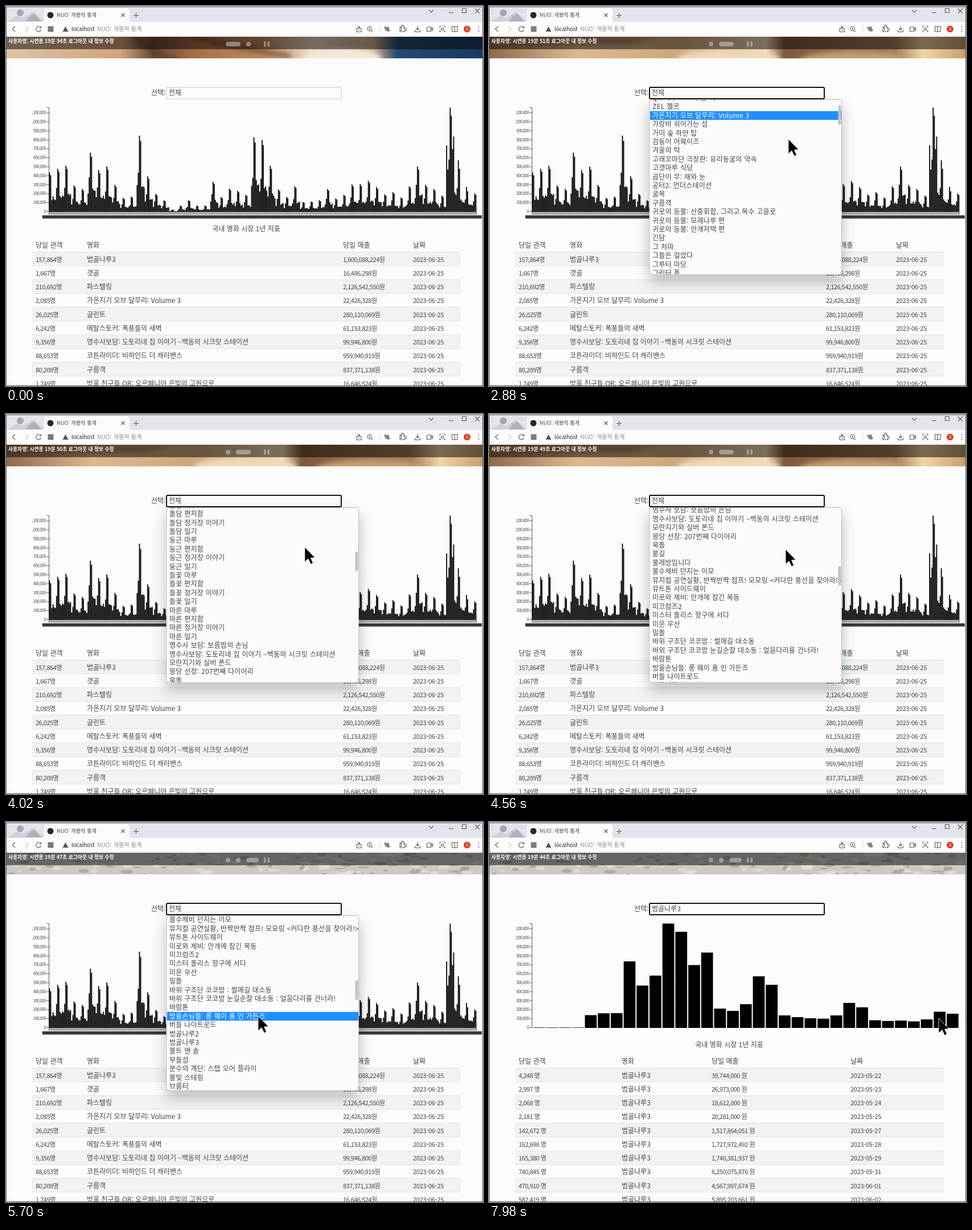
An HTML page for the animation above (8000 ms loop, 838 by 668 pixels).

```html
<!DOCTYPE html>
<html lang="ko">
<head>
<meta charset="utf-8">
<title>개봉작 통계</title>
<style>
html, body { margin: 0; width: 100%; height: 100%; overflow: hidden; background: #fcfcfc; }
svg { display: block; }
text { font: 400 12px "Noto Sans CJK KR", "Noto Sans CJK", "Noto Sans", sans-serif; fill: #414346; white-space: pre; }
.head { font-weight: 500; }
.num { font-size: 11px; letter-spacing: -.5px; }
.date { font-size: 11px; letter-spacing: -.25px; }
.axis { font-size: 7px; letter-spacing: -.45px; text-anchor: end; }
.option { letter-spacing: .25px; }
.bar { font-size: 8.75px; font-weight: 700; fill: #fff; }
.icon { fill: none; stroke: #555a60; stroke-width: 1.1; }
</style>
</head>
<body>
<svg id="stage" width="838" height="668" viewBox="0 0 838 668">
  <defs>
    <clipPath id="photoClip"><rect x="1" y="54" width="836" height="38"/></clipPath>
    <clipPath id="listClip"><rect x="283" y="165" width="336" height="306.5"/></clipPath>
    <clipPath id="axisClip"><rect x="46" y="170" width="40" height="200"/></clipPath>
    <filter id="soft"><feGaussianBlur stdDeviation="4"/></filter>
    <filter id="shadow" x="-20%" y="-20%" width="140%" height="140%">
      <feDropShadow dx="0" dy="12" stdDeviation="12" flood-opacity=".25"/>
    </filter>
    <linearGradient id="fur">
      <stop offset="0" stop-color="#dfc3a6"/><stop offset=".24" stop-color="#d2a27b"/>
      <stop offset=".31" stop-color="#6a4834"/><stop offset=".4" stop-color="#a97048"/>
      <stop offset=".54" stop-color="#c18b5e"/><stop offset=".64" stop-color="#ead8c2"/>
      <stop offset=".77" stop-color="#cfae91"/><stop offset=".82" stop-color="#254a70"/>
      <stop offset="1" stop-color="#183a60"/>
    </linearGradient>
    <linearGradient id="warm">
      <stop offset="0" stop-color="#8f6a4c"/><stop offset=".18" stop-color="#dcb88f"/>
      <stop offset=".4" stop-color="#cfa67b"/><stop offset=".58" stop-color="#f3ddbb"/>
      <stop offset=".62" stop-color="#80583b"/><stop offset=".85" stop-color="#a67b56"/>
      <stop offset=".91" stop-color="#f1d5a6"/><stop offset="1" stop-color="#c99c6c"/>
    </linearGradient>
  </defs>

  <rect width="838" height="668" fill="#fcfcfc"/>
  <rect width="838" height="28" fill="#e1e4ea"/>
  <path d="M4 27L20 17L30 22L47 10L66 27Z" fill="#cdd0d6"/>
  <path d="M41 18L50 13L62 27H36Z" fill="#aeb2b9"/>
  <circle cx="25" cy="12" r="6" fill="#a3a7ad"/>
  <path d="M64 28Q67 28 67 23V9Q67 4 72 4H212Q217 4 217 9V23Q217 28 220 28Z" fill="#fbfbfc"/>
  <circle cx="78" cy="16" r="5.5" fill="#2b2622"/>
  <text x="89" y="19" style="font-size:9.2px">NUO: 개봉작 통계</text>
  <rect y="28" width="838" height="26" fill="#fdfdfd"/>
  <g class="icon">
    <path d="M202.500 13l6 6m0-6l-6 6M224 16.500h9m-4.500-4.500v9M743 7l4 4l4-4M778 11.500h8M801.500 4.500h7v7h-7zM824 4.500l8 8m0-8l-8 8"/>
    <path d="M16 36l-5 4.500l5 4.500"/>
    <path d="M34 36l5 4.500l-5 4.500" stroke="#c3c5c8"/>
    <path d="M61 38a4.600 4.600 0 1 0 .5 4M61.500 35.500v3h-3"/>
    <path d="M618 39.500h-2v6h8v-6h-2M620 43v-7m-2.500 2.500l2.500-2.500l2.500 2.500"/>
    <circle cx="638.500" cy="40" r="3.700"/><path d="M641.200 42.700l3 3M637 40h3m-1.500-1.500v3"/>
    <path d="M656.500 35v11" stroke="#d6d8da"/>
    <path d="M692 37h3a2 2 0 1 1 3 0h2v3a2 2 0 1 1 0 3v2h-8v-3a2 2 0 1 0 0-3z"/>
    <path d="M723 35v7m-3-3l3 3l3-3M718.500 42v3.500h9V42M739.500 37h7v7.500h-7zM746.500 40l3-2v5l-3-2"/>
    <path d="M762 38v-2.500h2.500m4 0h2.500v2.500m0 4.500v2.500h-2.500m-4 0H762v-2.500M783.500 36h9.500v9h-9.500zM788.200 36v9"/><circle cx="766.500" cy="40.500" r="2"/>
  </g>
  <rect x="73.500" y="35.500" width="10" height="10" rx="1" fill="#777c82"/>
  <path d="M104.500 36l5 9h-10z" fill="#4f545a"/>
  <path d="M664 36l4 1l4-1l1 4l2 4l-5 1l-4-3z" fill="#7d8287"/>
  <circle cx="810" cy="40.500" r="6" fill="#e0402f"/>
  <text x="810" y="43" text-anchor="middle" style="font-size:7px;fill:#fff">S</text>
  <path d="M830.500 36v10" stroke="#555a60" stroke-width="1.600" stroke-dasharray="1.600 2.400"/>
  <text x="115" y="44" style="font-size:9.500px;fill:#222">localhost</text>
  <text x="160" y="44" style="font-size:10.300px;fill:#8b8e92">NUO: 개봉작 통계</text>

  <g clip-path="url(#photoClip)">
    <g class="slide">
      <rect x="0" y="54" width="838" height="38" fill="url(#fur)"/>
      <g filter="url(#soft)"><path d="M225 50q30 38 75 44M320 50q60 20 180 38" fill="none" stroke="#52362a" stroke-width="9" opacity=".6"/><ellipse cx="590" cy="94" rx="70" ry="20" fill="#f4e9d9"/></g>
    </g>
    <g class="slide">
      <rect x="0" y="54" width="838" height="38" fill="url(#warm)"/>
      <g filter="url(#soft)"><ellipse cx="420" cy="92" rx="90" ry="15" fill="#f0d8b5"/><ellipse cx="640" cy="96" rx="95" ry="16" fill="#c79d74"/><path d="M0 54h300l-60 14H60z" fill="#8a6140" opacity=".6"/></g>
    </g>
    <g class="slide" id="stone"><rect x="0" y="54" width="838" height="38" fill="#cdc8c1"/></g>
    <rect y="54" width="838" height="22" opacity=".5"/>
  </g>
  <text class="bar" id="clock" x="4" y="65"></text>
  <g fill="#d0d4da" opacity=".5">
    <rect class="dot" y="63" height="8" rx="4"/><rect class="dot" y="63" height="8" rx="4"/><rect class="dot" y="63" height="8" rx="4"/>
    <path d="M453 62.500h3.500v9H453zM459.500 62.500h3.500v9h-3.500z"/>
  </g>

  <text x="255" y="157">선택:</text>
  <rect id="field" x="282" y="143" width="307" height="20" fill="#fdfcfd"/>
  <text id="choice" x="286" y="157"></text>

  <g id="axis"></g>
  <text x="422" y="396" text-anchor="middle">국내 영화 시장 1년 지표</text>
  <g id="stripes"></g>
  <g id="all"></g>
  <g id="one"></g>

  <g id="popup">
    <rect x="282" y="164.500" width="337.500" height="307.500" rx="4" fill="#fdfafd" stroke="#bdbdc0" filter="url(#shadow)"/>
    <g clip-path="url(#listClip)">
      <g id="list"><rect id="hover" x="282" width="337" height="15.400" fill="#1e90ff"/></g>
      <rect id="thumb" x="613.500" width="5" height="34" rx="2.500" fill="#c2c2c5"/>
    </g>
  </g>
  <path d="M.5 668V1.500H837.500V668M0 667.500H838" fill="none" stroke="#5a5c60"/>
  <path id="cursor" d="M0 0V26L6 20.500L10.500 30L14.500 28L10.500 19L18 18.500Z" stroke="#fff" stroke-width=".8"/>
</svg>

<script>
const LOOP = 8000, FRAME = 60, ROW = 15.4, LIST_TOP = 164.4, BASE = 362, SCALE = .1579;
const OPEN = 1620, PICK = 6660, LOADED = 6840;
const $ = id => document.getElementById(id);
const add = (id, markup) => $(id).insertAdjacentHTML('beforeend', markup);
const text = (x, y, s, cls = '') => `<text x="${x}" y="${y}" class="${cls}">${s}</text>`;

let seed = 7;
const random = () => (seed = seed * 16807 % 2147483647) / 2147483647;

const PICKED = '범골나루3';
const CASE = '명수사보담: 도토리네 집 이야기 ~백동의 시크릿 스테이션';
const SPACE = '가온지기 오브 달무리: Volume 3';
const fillers = ['돌담', '둥근', '들꽃', '마른'].flatMap(a => ['마루', '편지함', '정거장 이야기', '일기'].map(b => a + ' ' + b));
const titles = [
  ...`전체|1802호의 이웃들|2층의 라디오|4월의 낮달|9번 창고|QK 파수 오브 구름-팩|ZEL 젤르|${SPACE}|가랑비 쉬어가는 섬|거미 숲 하얀 탑|검둥이 어웨이즈|겨울의 턱|고래꼬마단 극장판: 유리동굴의 약속|고갯마루 식당|곱단이 무: 재와 눈|공터2: 언더스테이션|굴목|구름객|귀로의 등불: 산중회합, 그리고 목수 고을로|귀로의 등불: 모래나루 편|귀로의 등불: 안개저택 편|긴담|그 처마|그들은 걸었다|그루터 마당|그린터 폴`.split('|'),
  ...'극장판 콩이네 야단법석: 구름소동 목수 딱지원정대|극장판 콩이네 야단법석: 와글와글! 춤추는 버섯골운동회|극장판 방울친구단QR: 소나기와 바람의 종이배 무리미|극장판 로보씽씽: 신기한 열차역의 편지|꼬마오리 나롱의 들판 대소동|나무 아래에 눕다|낮은 지붕 30호|내 작은 이모의 점심바구니|너른 들을 가로지르면|너머 골목은.|네모 서랍속의 젖은 우산|논틀|눅|눈썹 대장5: 코튼 캡틴나리와 버튼타운의 소문|느릅마당|니 모자 그림자 접고 간다|니은집|다섯 나루|대숲길|대패질'.split('|'),
  ...fillers,
  ...`명수사 보담: 보름밤의 손님|${CASE}|모란지기와 실버 폰드|몽당 선장: 207번째 다이어리|묵돌|뭍길|물레방입니다|물수제비 던지는 이모|뮤지컬 공연실황, 반짝반짝 점프! 모모링 &lt;커다란 풍선을 찾아라!&gt;|뮤트톤 사이드웨이|미로와 제비: 안개에 잠긴 목동|미끄럼즈2|미스터 돌리스 항구에 서다|미운 우산|밀돌|바위 구조단 코코밤 : 썰매길 대소동|바위 구조단 코코밤 눈길순찰 대소동 : 얼음다리를 건너라!|바람톤|방울손님들: 롱 웨이 홈 인 가든즈|버들 나이트로드|범골나루2|${PICKED}|볼트 앤 솔|부들섬|분수의 계단: 스텝 오어 플라이|불빛 스테핑|브룸터`.split('|')
];

// Thousands of viewers: Saturday peaks over a year, then the days of one film.
const peaks = [440, 480, 515, 295, 255, 660, 465, 505, 300, 155, 170, 850, 395, 200, 130, 25, 70, 130, 70, 70, 335, 165, 260, 235, 190, 830, 800, 515, 250, 165, 285, 110, 115, 130, 255, 150, 190, 305, 310, 345, 275, 195, 220, 160, 285, 505, 300, 255, 180, 150, 150, 150, 205];
const film = [4, 3, 2, 2, 143, 163, 165, 741, 471, 582, 1163, 1070, 700, 840, 215, 190, 265, 575, 480, 140, 120, 108, 103, 140, 278, 230, 85, 77, 82, 72, 95, 180, 158];
const weekShape = [1, .93, .36, .34, .34, .3, .5];
const DAYS = 366;

function dayValue(day) {
  const week = Math.floor(day / 7), weekday = day % 7;
  const peak = peaks[weekday > 4 ? Math.min(week + 1, 52) : week];
  const jitter = weekday < 2 ? 1 : .85 + .35 * random();
  return Math.max(peak * weekShape[weekday] * jitter, film[day - DAYS + film.length - 0] && day >= DAYS - 26 ? film[day - DAYS + film.length] : 0);
}

function bars(values, left, pitch, width) {
  const d = values.map((v, i) => `M${(left + i * pitch).toFixed(2)} ${BASE}v${(-Math.max(v * SCALE, .7)).toFixed(1)}h${width}V${BASE}z`);
  return `<path d="${d.join('')}"/>`;
}

function table(columns, heads, rows) {
  const classes = ['num', '', 'num', 'date'];
  return heads.map((h, c) => text(columns[c], 425, h, 'head')).join('') +
    rows.map((row, r) => row.map((cell, c) => text(columns[c], 449.5 + r * 24.25, cell, classes[c])).join('')).join('');
}

const yearRows = `157,864|${PICKED}|1,600,088,224
1,667|갯골|16,486,298
210,692|파스텔링|2,126,542,550
2,085|${SPACE}|22,426,328
26,025|글린트|280,110,069
6,242|메탈스토커: 폭풍들의 새벽|61,153,823
9,356|${CASE}|99,946,800
88,653|코튼라이더: 비하인드 더 캐러밴스|959,940,919
80,209|구름객|837,371,138
1,749|방울 친구들 QR: 오르페니아 은빛의 고원으로|16,646,524`
  .split('\n').map(line => line.split('|')).map(([n, title, won]) => [n + '명', title, won + '원', '2023-06-25']);

const filmRows = `4,248|39,744,000|05-22
2,997|26,973,000|05-23
2,068|18,612,000|05-24
2,181|20,281,000|05-25
142,672|1,517,864,051|05-27
162,698|1,727,972,492|05-28
165,380|1,740,381,937|05-29
740,845|6,250,075,876|05-31
470,910|4,567,997,674|06-01
582,419|5,895,203,661|06-02`
  .split('\n').map(line => line.split('|')).map(([n, won, date]) => [n + ' 명', PICKED, won + ' 원', '2023-' + date]);

const heads = ['당일 관객', '영화', '당일 매출', '날짜'];
let ticks = '', labels = '';
for (let i = 0; i < 12; i++) {
  const y = 361.5 - i * 15.79;
  ticks += `M71 ${y}h4.500`;
  labels += text(70, y + 2.5, (i * 100000).toLocaleString('en-US'), 'axis');
}
add('axis', `<path d="M71 178.500H75.500V361.500${ticks}" fill="none" stroke="#333" stroke-width=".8"/><g clip-path="url(#axisClip)">${labels}</g>`);

for (let r = 0; r < 10; r++) {
  const y = 432.5 + r * 24.25;
  add('stripes', `<rect x="46" y="${y}" width="753" height="24.250" fill="${r % 2 ? '#fcfcfc' : '#f0f2f4'}"/><path d="M46 ${y}h753" stroke="#dfe3e7"/>`);
}
add('all', bars(Array.from({ length: DAYS }, (_, d) => dayValue(d)), 75.6, 2.052, 1.75) +
  `<path d="M75 364.500H828" stroke="#555" stroke-width="5" stroke-dasharray="1 1.052"/>
   <path d="M64 370.700H836" stroke="#777" stroke-width="5.500"/>
   <path d="M64 370.700H836" stroke="#1c1c1c" stroke-width="5.500" stroke-dasharray="1.400 .652"/>` +
  table([52, 142, 592, 715], heads, yearRows));
add('one', bars(film, 77.7, 22.7, 20.7) + table([52, 233, 391, 635], heads, filmRows));
add('list', titles.map((s, i) => text(287, (LIST_TOP + i * ROW + 12).toFixed(1), s, 'option')).join(''));
for (let i = 0; i < 140; i++) {
  add('stone', `<ellipse cx="${random() * 838}" cy="${54 + random() * 38}" rx="${3 + random() * 9}" ry="${1 + random() * 3}" fill="${random() < .5 ? '#8f8a84' : '#ece9e4'}" opacity=".5"/>`);
}

const scrollKeys = [[2400, 0], [2880, 87.4], [3270, 403.4], [3570, 403.4], [4020, 720], [4260, 720], [4560, 957.8], [4800, 1062.6]];
const cursorKeys = [[1020, 640, 28], [1320, 553, 141], [1500, 545, 155], [2340, 545, 155], [2640, 526, 234], [3960, 525, 234], [4560, 521, 238], [4920, 521, 238], [5640, 443, 341], [5880, 443, 341], [6180, 443, 378], [6360, 444, 383], [7020, 444, 383], [7500, 640, 335], [7800, 812, 340], [7980, 790, 345]];
const clockTicks = [900, 1620, 2400, 3240, 4260, 4980, 5580, 6120, 6840, 7560];
const slideStarts = [780, 5160], SLIDE_TIME = 480;

const clamp = v => Math.min(1, Math.max(0, v));
const smooth = p => p * p * (3 - 2 * p);

function keyed(keys, t, column, ease = p => p) {
  const next = keys.findIndex(k => k[0] > t);
  if (next === 0) return keys[0][column];
  if (next < 0) return keys[keys.length - 1][column];
  const a = keys[next - 1], b = keys[next];
  return a[column] + (b[column] - a[column]) * ease((t - a[0]) / (b[0] - a[0]));
}

const show = (id, on) => $(id).setAttribute('visibility', on ? 'visible' : 'hidden');
const slides = document.querySelectorAll('.slide'), dots = document.querySelectorAll('.dot');

function drawCarousel(t) {
  const place = slideStarts.reduce((sum, start) => sum + smooth(clamp((t - start) / SLIDE_TIME)), 0);
  const active = slideStarts.filter(start => t >= start).length;
  slides.forEach((s, i) => s.setAttribute('transform', `translate(${(i - place) * 838})`));
  dots.forEach((dot, i) => {
    dot.setAttribute('x', 386 + i * 18 - (i > active ? 0 : 0) + (i > active ? 14 - 14 : 0) + (i > active ? 0 : 0));
    dot.setAttribute('width', i === active ? 22 : 8);
  });
}

function draw(t) {
  drawCarousel(t);
  $('clock').textContent = `사용자명: 시연용 19분 ${54 - clockTicks.filter(c => t >= c).length}초 로그아웃 내 정보 수정`;

  const focused = t >= OPEN;
  $('field').setAttribute('stroke', focused ? '#111' : '#c4c6c9');
  $('field').setAttribute('stroke-width', focused ? 2 : 1);
  $('field').setAttribute('rx', focused ? 2 : 0);
  $('choice').textContent = t < PICK ? '전체' : PICKED;

  show('all', t < LOADED);
  show('one', t >= LOADED);
  show('popup', focused && t < PICK);

  const x = keyed(cursorKeys, t, 1, smooth), y = keyed(cursorKeys, t, 2, smooth);
  show('cursor', t >= cursorKeys[0][0]);
  $('cursor').setAttribute('transform', `translate(${x} ${y})`);

  // The highlight trails the scrolling by a moment.
  const scroll = keyed(scrollKeys, t, 1);
  const hovered = Math.max(0, Math.floor((y - LIST_TOP + keyed(scrollKeys, t - 240, 1)) / ROW));
  $('list').setAttribute('transform', `translate(0 ${-scroll})`);
  $('hover').setAttribute('y', LIST_TOP + hovered * ROW);
  $('list').querySelectorAll('text').forEach((el, i) => { el.style.fill = i === hovered ? '#fff' : ''; });
  $('thumb').setAttribute('y', 165.5 + scroll / 9.4);
}

function tick() {
  draw(Math.floor(performance.now() % LOOP / FRAME) * FRAME);
  requestAnimationFrame(tick);
}
tick();
</script>
</body>
</html>
```
